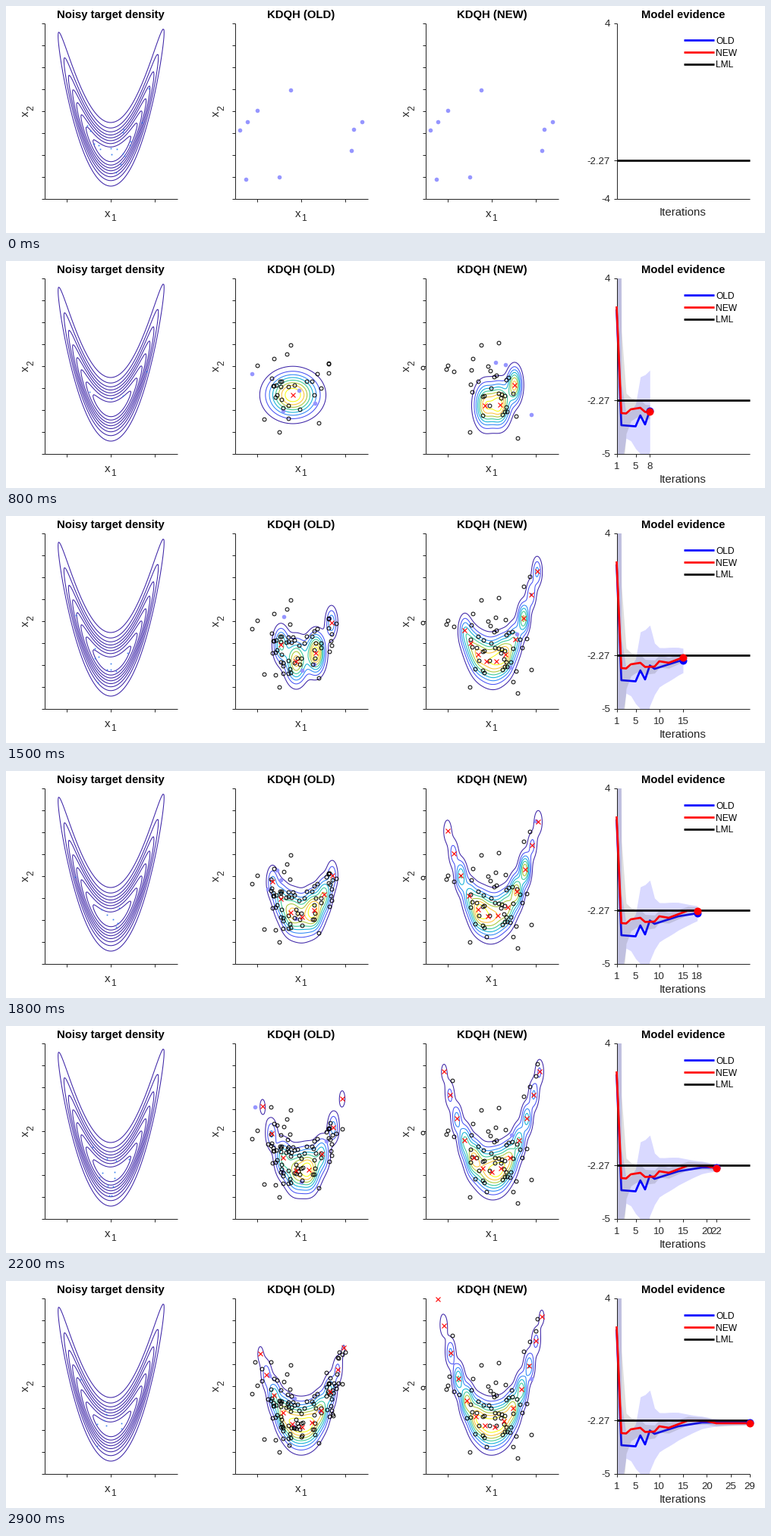
Recreate the animation shown at these times as a matplotlib script. Size 1000 by 300 pixels, loop 4.4 s.

```python
import numpy as np
import matplotlib.pyplot as plt
from matplotlib.animation import FuncAnimation

W, H, DPI = 1000, 300, 100
PX = 72 / DPI
TOP, BOTTOM, WIDTH = 22.5, 254.5, 175
LEFTS = (50.5, 301.5, 552.5, 804.5)
UX, UY, ZERO = WIDTH / 6, 29, 196    # pixels per unit, height of v = 0
LAST, FRAMES = 29, 44
INK, BLUE, RED, FRESH = "#262626", "#0000FF", "#FF0000", "#9696FF"
NAVY = "#3E26A8"
PARULA = [NAVY, "#4852F4", "#2E87F7", "#12B1D6",
          "#37C897", "#ABC739", "#FEC338", "#F9FB15"]

plt.rcParams["font.family"] = "Liberation Sans"
fig = plt.figure(figsize=(W / DPI, H / DPI), dpi=DPI, facecolor="white")
ax = fig.add_axes([0, 0, 1, 1])
ax.set_xlim(0, W)
ax.set_ylim(H, 0)
ax.set_autoscale_on(False)
ax.axis("off")


# ---------- drawing helpers ----------
def line(x, y, color=INK, lw=1, z=5):
    return ax.plot(x, y, color=color, lw=lw * PX, zorder=z,
                   solid_capstyle="butt", solid_joinstyle="round")[0]


def label(x, y, s, size, color=INK, ha="center", **kw):
    return ax.text(x, y, s, fontsize=size * PX, color=color, ha=ha,
                   va="baseline", zorder=9, **kw)


def marks(x, y, marker, size, face, edge, lw=1, z=4):
    return ax.plot(x, y, ls="none", marker=marker, ms=size * PX, mfc=face,
                   mec=edge, mew=lw * PX, zorder=z)[0]


def tick_x(x):
    return line([x, x], [BOTTOM, BOTTOM + 4])


def tick_y(x, y):
    return line([x - 4, x], [y, y])


def to_px(x0, u, v):
    return x0 + WIDTH / 2 + UX * u, ZERO - UY * v


U, V = np.meshgrid(np.linspace(-3, 3, 141), np.linspace(-2, 6, 187))


def contours(x0, d, colors):
    return ax.contour(*to_px(x0, U, V), d, levels=d.max() * np.arange(1, 9) / 9,
                      colors=colors, linewidths=1.05 * PX, zorder=3)


# ---------- density along the valley v = u^2 ----------
def profile(u, v):
    return np.exp(-u ** 2 / 8.5 - v ** 2 / 21.5)


def kernel(u, v, m):
    return np.exp(-((u - m["u"]) / m["su"]) ** 2 / 2
                  - ((v - m["v"]) / m["sv"]) ** 2 / 2)


def mixture(keys, n, power):
    """Components spread along the valley floor; keys hold
    (iteration, from, to, count, widening)."""
    cols = np.transpose(keys)
    lo, hi, count, wide = (np.interp(n, cols[0], c) for c in cols[1:])
    t = np.sin(np.linspace(-1, 1, round(count))) / np.sin(1)
    u = (lo + hi) / 2 + (hi - lo) / 2 * t
    mid = np.exp(-u ** 2)
    su, sv = (.15 + .17 * mid) * wide, .45 + .2 * mid
    m = dict(u=u, v=u ** 2 + su ** 2, su=su, sv=sv)
    overlap = kernel(u[:, None], m["v"][:, None], m).sum(1)
    wobble = np.random.default_rng(n).normal(0, .4 - .35 * n / LAST, len(u))
    m["h"] = profile(u, u ** 2) ** power / overlap * np.exp(wobble)
    return m


OLD = [(1, -.5, .5, 2, 2), (4, -1.35, 1.31, 2, 1), (8, -.38, -.38, 1, 2.4),
       (12, -.55, 1.33, 2, 1), (18, -1.3, 1.4, 7, 1), (22, -1.75, 1.85, 8, 1),
       (LAST, -1.85, 1.92, 11, 1)]
NEW = [(1, -.4, .6, 2, 2), (4, -.1, .82, 2, 1), (8, -.3, 1.03, 3, 1),
       (12, -.45, 2, 7, 1), (18, -2, 2.1, 12, 1), (LAST, -2.43, 2.26, 14, 1)]
old_mix = [mixture(OLD, n, 2) for n in range(1, LAST + 1)]
new_mix = [mixture(NEW, n, 1) for n in range(1, LAST + 1)]

START = np.array([(375, 111), (331, 138), (360, 226), (318, 153), (308, 164),
                  (316, 229), (455, 191), (458, 163), (469, 153)]) - (301.5, 0)


def sample(mixes, spread, count, seed):
    """New points of each iteration, drawn around its components."""
    rng = np.random.default_rng(seed)
    out = []
    for n, m in enumerate(mixes, 1):
        k = rng.integers(len(m["u"]), size=count(n))
        u = m["u"][k] + spread * m["su"][k] * rng.standard_normal(len(k))
        v = m["v"][k] + spread * .8 * m["sv"][k] * rng.standard_normal(len(k))
        out.append((u, np.clip(v, -1.6, 5.8)))
    return out


old_pts = sample(old_mix, 1.2, lambda n: 4, 3)
new_pts = sample(new_mix, 2, lambda n: max(1, 5 - n // 4), 8)


def posterior(x0, mixes, pts, n):
    kept = START if n < 7 else START[:3]
    xy = [(x0 + kept[:, 0], kept[:, 1])] + [to_px(x0, *p) for p in pts[:n]]
    out = [marks(*xy[n], "o", 5.6, FRESH, FRESH, 0)]
    if n:
        m = mixes[n - 1]
        d = (m["h"] * kernel(U[..., None], V[..., None], m)).sum(-1)
        out += [marks(*np.hstack(xy[:n]), "o", 4.8, "none", "black"),
                contours(x0, d, PARULA),
                marks(*to_px(x0, m["u"], m["v"]), "x", 6, "none", RED, 1.1)]
    return out


def specks(n):
    r = np.random.default_rng(100 + n)
    count = r.integers(4, 14) if n else 18
    u = np.clip(r.normal(0, .8, count), -1.7, 1.7)
    v = u ** 2 + r.normal(0, .45, count)
    return marks(*to_px(LEFTS[0], u, v), "s", 1.7, "#3A82F0", "none", 0)


# ---------- evidence curves, in pixels ----------
ITER = np.arange(1, LAST + 1)
old_y = np.interp(ITER, [1, 2, 5, 6, 7, 8, 9, 11, 14, 19, 29],
                  [64, 217, 218.5, 204, 216, 197.5, 202, 198, 192, 187, 186.8])
new_y = np.interp(ITER, [1, 2, 3, 4, 6, 7, 9, 10, 12, 16, 20, 22],
                  [60, 201, 201.5, 196, 194, 199.5, 199, 192, 194, 184.5, 185,
                   188])
old_h = (3000 * np.exp(-4.3 * (ITER - 1)) + 3
         + 22 * np.exp(-(ITER - 9) ** 2 / 70)
         + 42 * np.exp(-(ITER - 7) ** 2 / 2.6))
new_h = 2500 / ITER ** 4.7 + 15 * .94 ** ITER


def at(n):
    return LEFTS[3] + (n - 1) * WIDTH / (LAST - 1)


def band(y, h, n, color, alpha, z):
    t = np.linspace(1, n, 60 * n)
    lo, hi = (np.clip(np.interp(t, ITER, y + s * h), TOP, BOTTOM)
              for s in (-1, 1))
    return ax.fill_between(at(t), lo, hi, color=color, alpha=alpha, lw=0,
                           zorder=z)


def evidence(n):
    x0, low = LEFTS[3], -5 if n else -4
    out = [label(x0 + WIDTH / 2, 293 if n else 277, "Iterations", 15)]
    for val in (4, -2.27, low):
        y = TOP + (4 - val) * (BOTTOM - TOP) / (4 - low)
        out += [tick_y(x0, y),
                label(x0 - 8.5, y + 4.8, f"{val}", 13.3, ha="right")]
        if val == -2.27:
            out.append(line([x0, x0 + WIDTH], [y, y], "black", 2.7, 6))
    if not n:
        return out
    for k in sorted({1, n, *range(5, n, 5)}):
        out += [tick_x(at(k)), label(at(k), 275, str(k), 13.3)]
    x = at(ITER[:n])
    out += [band(old_y, old_h, n, BLUE, .15, 1),
            line(x, old_y[:n], BLUE, 2.7, 2),
            band(new_y, new_h, n, "#606060", .2, 3),
            line(x, new_y[:n], RED, 2.7, 5.5),
            marks(x[-1:], old_y[n - 1:n], "o", 10, BLUE, BLUE, 0, 7),
            marks(x[-1:], new_y[n - 1:n], "o", 10, RED, RED, 0, 8)]
    return out


# ---------- static parts ----------
NAMES = ("Noisy target density", "KDQH (OLD)", "KDQH (NEW)", "Model evidence")
for x0, name in zip(LEFTS, NAMES):
    label(x0 + WIDTH / 2, 16, name, 14.9, "black", weight="bold")
    line([x0, x0], [TOP, BOTTOM])
    line([x0, x0 + WIDTH], [BOTTOM, BOTTOM])

for x0 in LEFTS[:3]:
    for j in range(9):
        tick_y(x0, TOP + UY * j)
    for j in (1, 3, 5):
        tick_x(x0 + j * UX)
    label(x0 + 79, 279, "x", 15, ha="left")
    label(x0 + 88, 284, "1", 12, ha="left")
    up = dict(ha="left", rotation=90, rotation_mode="anchor")
    label(x0 - 20.5, 146, "x", 15, **up)
    label(x0 - 14.5, 138, "2", 12, **up)

for j, (color, name) in enumerate(((BLUE, "OLD"), (RED, "NEW"),
                                   ("black", "LML"))):
    y = 45.4 + 15.8 * j
    line([892.5, 932.5], [y, y], color, 2.7)
    label(935, y + 4.3, name, 12, "black", ha="left")

contours(LEFTS[0], profile(U, V) * np.exp(-(U ** 2 - V) ** 2
                                          - (U - 1) ** 2 / 100), [NAVY] * 8)

live = []


def draw(frame):
    while live:
        live.pop().remove()
    n = min(frame, LAST)
    live.append(specks(n))
    live.extend(posterior(LEFTS[1], old_mix, old_pts, n))
    live.extend(posterior(LEFTS[2], new_mix, new_pts, n))
    live.extend(evidence(n))
    return live


anim = FuncAnimation(fig, draw, frames=FRAMES, interval=100,
                     init_func=lambda: draw(0), repeat=True, repeat_delay=0,
                     blit=False)
plt.show()
```
